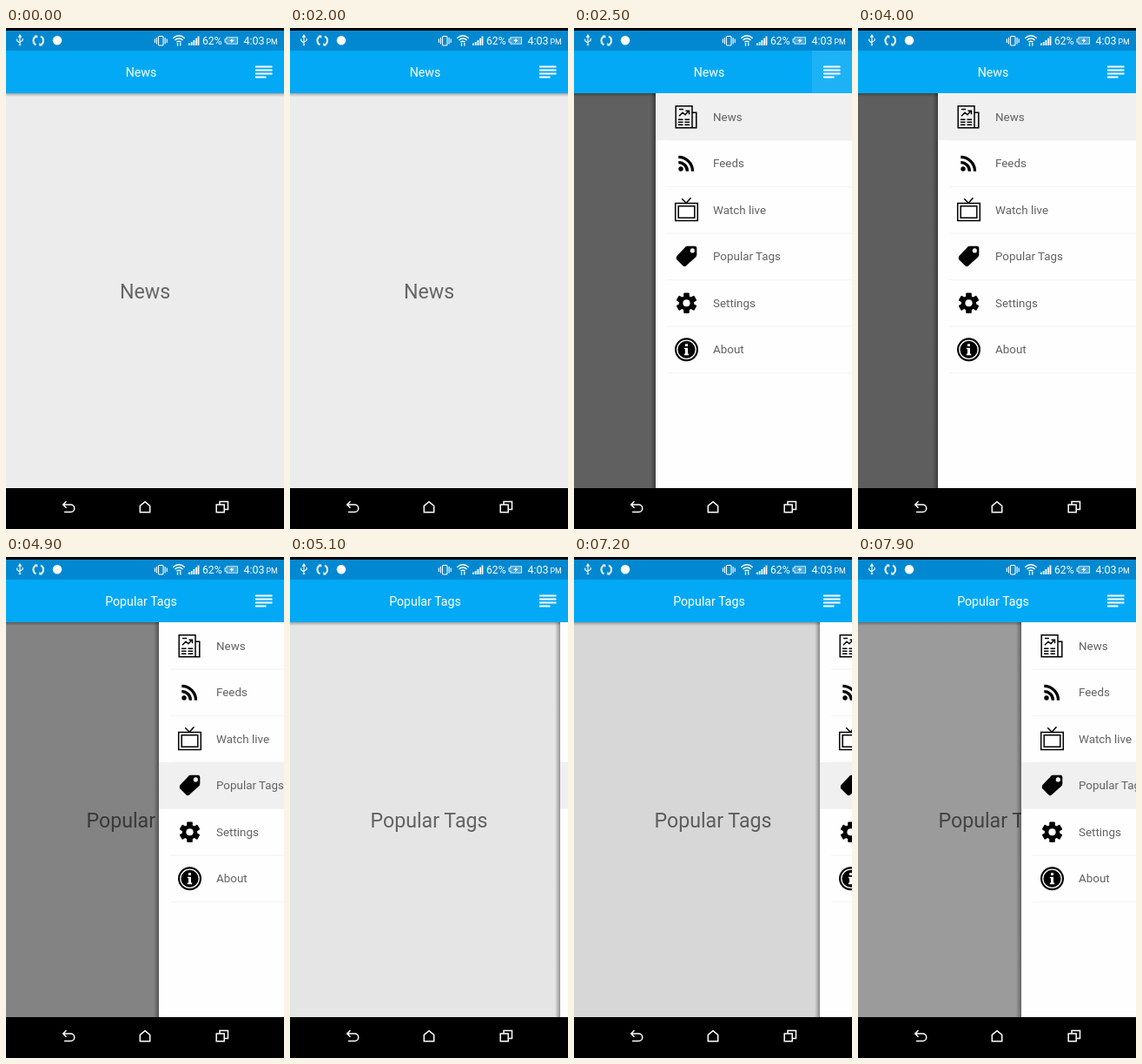
Recreate the animation shown at these times as an HTML page. Size 320 by 576 pixels, loop 8 s.

```html
<!DOCTYPE html>
<html lang="en">
<head>
<meta charset="utf-8">
<title>Navigation drawer</title>
<style>
  html, body { margin: 0; width: 100%; height: 100%; overflow: hidden; background: #000; }
  svg { display: block; width: 320px; height: 576px; font-family: Roboto, sans-serif; }
  .line { fill: none; stroke: #fff; stroke-width: 1.5; }
  .ink { fill: none; stroke: #000; stroke-width: 1.5; }
</style>
</head>
<body>
<svg viewBox="0 0 320 576">
  <defs>
    <linearGradient id="under" x2="0" y2="1">
      <stop stop-color="#000" stop-opacity=".3"/>
      <stop offset="1" stop-color="#000" stop-opacity="0"/>
    </linearGradient>
    <linearGradient id="edge">
      <stop stop-color="#000" stop-opacity="0"/>
      <stop offset="1" stop-color="#000" stop-opacity=".36"/>
    </linearGradient>
    <clipPath id="page"><rect y="75" width="320" height="454"/></clipPath>
  </defs>

  <!-- page -->
  <rect y="75" width="320" height="454" fill="#ececec"/>
  <text id="heading" x="160" y="311" font-size="23.2" text-anchor="middle" fill="#666"></text>
  <rect y="75" width="320" height="4" fill="url(#under)"/>

  <!-- drawer -->
  <g clip-path="url(#page)">
    <rect id="scrim" y="75" width="320" height="454"/>
    <g id="drawer">
      <rect x="-6" y="75" width="6" height="454" fill="url(#edge)"/>
      <rect y="75" width="240" height="454" fill="#fefefe"/>
      <rect id="pick" width="240" height="53.5" fill="#f0f0f0"/>
      <g id="rows" font-size="13.4" fill="#626262"></g>
    </g>
  </g>

  <!-- app bar -->
  <rect y="26" width="320" height="49" fill="#03a9f4"/>
  <rect id="press" x="274" y="26" width="46" height="49" fill="#fff" opacity=".1"/>
  <text id="title" x="155.5" y="56" font-size="14.2" text-anchor="middle" fill="#fff"></text>
  <path d="M287 44.5h19.5M287 48.5h19.5M287 52.5h19.5M287 56.5h12.5" class="line" stroke-width="2" style="stroke-width:2"/>

  <!-- status bar -->
  <rect y="3" width="320" height="23" fill="#0288d1"/>
  <g class="line" style="stroke-width:1.1">
    <path d="M16 9v11M12.8 12.5v2.2L16 17.2M19.2 12v2.2L16 16.4"/>
    <path d="M16 8l-1.3 2.2h2.6zM14.8 19.5h2.4" fill="#fff"/>
    <path d="M34.5 9.7a5.3 5.3 0 0 0 0 9.6M40 9.7a5.3 5.3 0 0 1 0 9.6" stroke-width="1.9"/>
    <path d="M32.6 8.4h3.6v3.6zM41.9 20.6h-3.6v-3.6z" fill="#fff" stroke="none"/>
    <rect x="175.5" y="9.5" width="5.5" height="10.5" rx="1"/>
    <path d="M173.4 11v7.5M171.3 12.5v4.5M183.1 11v7.5M185.2 12.5v4.5"/>
    <path d="M192.3 11.7q6.700-6 13.400 0M194.4 14q4.600-4 9.200 0M196.500 16.200q2.500-2 5 0" stroke-width="1.5"/>
    <path d="M197.500 17.200v3.500M200.800 17v3.500" stroke-width="1.300"/>
    <path d="M211 17.500V20M213.700 16V20M216.400 14V20M219.100 11.800V20M221.500 9.500V20" stroke-width="1.800"/>
    <path d="M254 10.700h12.500v7.600H254v-2h-2v-3.600h2z" fill="#fff" fill-opacity=".25" stroke="#cfe7f6"/>
    <path d="M260.800 11.500l-3.600 3.500h2.400l-.8 2.500 4-3.700h-2.500z" fill="#fff" stroke="none"/>
  </g>
  <circle cx="59" cy="14.300" r="5.200" fill="#fff"/>
  <g fill="#fff">
    <text x="226" y="19" font-size="12.200">62%</text>
    <text x="273.500" y="19" font-size="12.500">4:03</text>
    <text x="299.500" y="19" font-size="8.800">PM</text>
  </g>

  <!-- navigation keys -->
  <g class="line">
    <path d="M66 548h8.500a4 4 0 0 1 0 8.500H67M69.500 544.300L65.700 548l3.800 3.700"/>
    <path d="M154.300 549.300L160 544.700l5.700 4.600v7.400h-11.400z"/>
    <path d="M242.200 548h9v8.800h-9zM246 547.500v-3h9.500v9h-4"/>
  </g>
</svg>

<script>
const LOOP = 8000, STEP = 100, WIDTH = 228, SETTLE = 512;
const TOP = 75.500, ROW = 53.500;
const OPEN = 2190, CLOSE = 4855, DRAG = 6900;
const dragged = [0, 16, 24, 37, 53, 72, 92, 110, 122, 130, 132];
const $ = id => document.getElementById(id);

// Icons are drawn around their own centre.
const icons = {
  'News': `<path class="ink" d="M-12.300-12.500H6.500V12.500H-12.300zM6.500-5H11.300V12.500H6.500"/>
    <path class="ink" d="M-8.500-8.800h5M-8.500-1l4-4 3 2.500 4-4.500M-1-7h4v4M-9.500 3h5.500M-2 3h5.500M-9.500 6h5.500M-2 6h5.500M-9.500 9h5.500M-2 9h5.500"/>`,
  'Feeds': `<circle cx="-6.500" cy="6.200" r="2.700"/>
    <path class="ink" style="stroke-width:3.300" d="M-9.200-1.200A10 10 0 0 1 .9 8.900M-9.200-7.300A16.200 16.200 0 0 1 7 8.900"/>`,
  'Watch live': `<path class="ink" d="M-12.800-7.800H12.800V12.300H-12.800zM-9.300-4.500H9.300V9H-9.300z"/>
    <path class="ink" d="M-5.300-13L-.3-8 5-14"/>`,
  'Popular Tags': `<path d="M1-12H9.500Q11.800-12 11.800-9.700V-2Q11.800-.6 10.800.4L-.6 10.800Q-2.300 12.300-4 10.700L-11 3.800Q-12.500 2.200-11-.7L-1-11.200Q-.2-12 1-12z"/>
    <circle cx="6.800" cy="-6.800" r="2.600" fill="#f4f4f4"/>`,
  'Settings': [0, 60, 120].map(a =>
      `<rect x="-3.300" y="-11.800" width="6.600" height="23.600" rx="1" transform="rotate(${a})"/>`).join('') +
    `<circle r="8.600"/><circle r="4.100" fill="#fefefe"/>`,
  'About': `<circle r="13.500"/><circle r="10.700" fill="none" stroke="#fff" stroke-width="1.300"/>
    <path fill="#fff" d="M-1.500-6.500h3v2.800h-3zM-2.700-2H1.500V4.800H2.700V6.500H-2.700V4.800H-1.500V-.4H-2.700z"/>`
};
const names = Object.keys(icons);

$('rows').innerHTML = names.map((name, i) => {
  const mid = TOP + ROW * (i + .5);
  return `<g transform="translate(35.500 ${mid})" fill="#000">${icons[name]}</g>
    <text x="66" y="${mid + 4.700}">${name}</text>
    <rect x="13" y="${TOP + ROW * (i + 1) - .500}" width="227" height="1" fill="#f4f4f4"/>`;
}).join('');

const settle = ms => 1 - (1 - Math.min(1, Math.max(0, ms / SETTLE))) ** 5;

// Visible drawer width at time t.
function reveal(t) {
  if (t >= DRAG) {
    const k = (t - DRAG) / STEP, i = Math.min(Math.floor(k), dragged.length - 2);
    return dragged[i] + (dragged[i + 1] - dragged[i]) * (k - i);
  }
  return WIDTH * (t < CLOSE ? settle(t - OPEN) : 1 - settle(t - CLOSE));
}

function draw(now) {
  const t = Math.floor((now % LOOP) / STEP) * STEP;
  const page = t < 4900 ? 'News' : 'Popular Tags';
  const shown = Math.round(reveal(t));
  $('title').textContent = $('heading').textContent = page;
  $('pick').setAttribute('y', TOP + ROW * names.indexOf(page));
  $('drawer').setAttribute('transform', `translate(${320 - shown} 0)`);
  $('drawer').style.display = shown ? '' : 'none';
  // The dimming trails the drawer by one display refresh.
  $('scrim').setAttribute('opacity', .6 * reveal(t - 16) / WIDTH);
  $('press').style.display = t >= 2200 && t < 2700 ? '' : 'none';
}

const start = performance.now();
function tick() {
  draw(performance.now() - start);
  requestAnimationFrame(tick);
}
tick();
</script>
</body>
</html>
```
